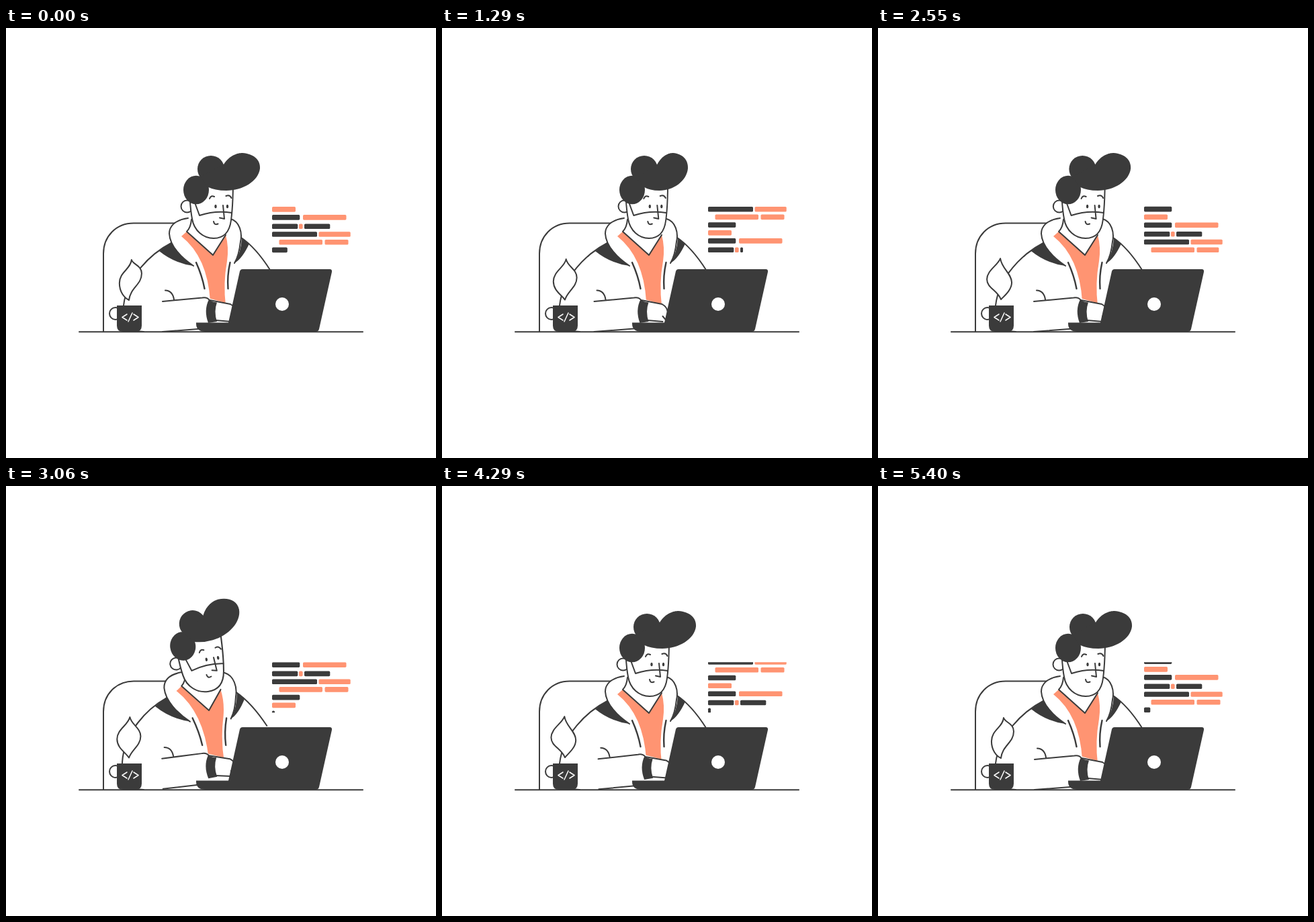
An HTML page that plays this animation: 640 by 640 pixels, repeating every 5.43 s.

```html
<!DOCTYPE html>
<html lang="en">
<head>
<meta charset="utf-8">
<title>Developer at work</title>
<style>
  html, body { margin: 0; width: 100%; height: 100%; overflow: hidden; background: #fff; }
  svg { display: block; width: 100%; height: 100%; }
  .line { fill: none; stroke: #3b3b3b; stroke-width: 2; stroke-linecap: round; stroke-linejoin: round; }
  .bold { stroke-width: 2.4; }
  .dark { fill: #3b3b3b; }
  .coral { fill: #ff9472; }
  .white { fill: #fff; }
</style>
</head>
<body>
<svg viewBox="0 0 640 640">
  <clipPath id="window"><rect x="390" y="262.3" width="130" height="74.9"/></clipPath>

  <path class="line" d="M145 452V336C145 310 164 290.500 190 290.500H260"/>

  <g id="torso">
    <path class="white" d="M268 283C250 288 243 296 243 306Q243 315 246 320C215 336 180 370 175 413C173 440 185 452 205 452H350L393 360Q372 325 349 311C352 300 346 288 336 284Z"/>
    <path class="line" d="M246 320C215 336 180 370 175 413C173 440 185 452 205 452M350 312Q372 327 393 360"/>
    <path class="coral" d="M261 310L269 303L308 338L327 308Q332 326 329 347Q323 380 327 413L304 407Q300 341 261 310Z"/>
    <path class="line" d="M276 285Q275 297 269 303L308 338L327 308"/>
    <path class="line" d="M271 283C250 286 243 296 243 306C244 325 262 343 279 354M334 284C348 288 352 305 349 318Q347 338 340 350"/>
    <path class="dark" d="M228 332L246 319Q258 340 279 354Q250 350 228 332ZM351 312L362 321Q352 343 340 350Q350 334 351 312Z"/>
    <path class="line bold" d="M283 349Q292 369 295.500 388M333.500 349Q329 369 330.500 388"/>
  </g>

  <g id="arm">
    <path class="white" d="M233 408L298 401L340 413V438L290 448L233 451Z"/>
    <path class="line" d="M233 407L292 401.500Q299 400 303 405L334 411Q341 415 342 421M233 452L292 447.500M237 390.500Q248 391 250 404M312 435L335 437M335 429L340 435"/>
    <path class="dark" d="M302 404Q307 408 314 408.500Q309 422 314 437L301 439Q294 420 302 404Z"/>
  </g>

  <g id="head">
    <g id="ear"><circle class="line" cx="269.500" cy="265.500" r="9" style="fill:#fff"/></g>
    <g id="face">
      <path class="line" style="fill:#fff" d="M273 240Q274 268 277 284C280 302 294 313 309 313C325 313 333 302 335 286Q338 264 338 226Z"/>
    </g>
    <g id="features">
      <path class="line" d="M281 260L288 279Q312 271 336 275"/>
      <path class="line" d="M323 264L325 284L318 282.500M309 288Q310 294 315.500 291.500M303 254Q305 248.500 310 251M327.500 250Q333 247.500 335.500 253"/>
      <ellipse class="dark" cx="312" cy="265.500" rx="1.700" ry="2.800"/>
      <ellipse class="dark" cx="329.500" cy="265.500" rx="1.700" ry="2.800"/>
    </g>
    <ellipse class="dark" cx="283" cy="241" rx="19" ry="21.300"/>
    <circle class="dark" id="curl" cx="305" cy="210" r="20"/>
    <path class="dark" id="quiff" d="M290 221L324 203C333 189 345 186 352 186C368 187 379 196 378 209C376 228 352 242 328 242Q311 242 299 236Z"/>
  </g>

  <path class="line" id="steam" style="fill:#fff"/>
  <circle class="line" cx="163" cy="425" r="9"/>
  <path class="dark" d="M165 413H202V443Q202 452 193 452H174Q165 452 165 443Z"/>
  <path class="line" style="stroke:#fff;stroke-width:1.500" d="M180 426L173 430.500L180 435M188 424L182 437M190 426L197 430.500L190 435"/>

  <path class="dark" d="M283 438.500H331L348 362Q349 359 352 359H482Q485.500 359 485 363L466 448Q465 452 461 452H297Q283 452 283 440Z"/>
  <circle class="white" cx="411" cy="411" r="10"/>
  <path class="line" d="M109 452.300H531"/>

  <g id="code" clip-path="url(#window)"></g>
</svg>
<script>
const $ = id => document.getElementById(id);
const LOOP = 5430, TICK = 30, HALF = LOOP / 2 / TICK;
const DARK = 'dark', CORAL = 'coral';

// start is in ticks; gap is the distance to the row above; bars are [x, width, colour]
const rows = [
  { start: -3.8, gap: 11.7, bars: [[396, 41.3, DARK]] },
  { start: 3.6, gap: 11.8, bars: [[396, 35, CORAL]] },
  { start: 10.3, gap: 12, bars: [[396, 41.3, DARK], [442, 64.5, CORAL]] },
  { start: 29.2, gap: 13.3, bars: [[396, 38.3, DARK], [436, 5.6, CORAL], [444, 38.3, DARK]] },
  { start: 50, gap: 11.8, bars: [[396, 67, DARK], [465.5, 47.2, CORAL]] },
  { start: 67.7, gap: 11.7, bars: [[406.5, 64.5, CORAL], [474.5, 35, CORAL]] }
];

const clamp = x => Math.min(1, Math.max(0, x));
const smooth = x => x * x * (3 - 2 * x);
const cubic = x => x < .5 ? 4 * x ** 3 : 1 - 4 * (1 - x) ** 3;
// rises over a..b, holds, falls over c..d
const pulse = (t, a, b, c, d) => smooth(clamp((t - a) / (b - a))) - smooth(clamp((t - c) / (d - c)));
const move = (id, value) => $(id).setAttribute('transform', value);

function drawRow(row, y, time) {
  const total = row.bars.reduce((sum, bar) => sum + bar[1], 0);
  let done = 0, out = '';
  for (const [x, width, colour] of row.bars) {
    const part = clamp((time * total - done) / width);
    done += width;
    if (part > 0) {
      const w = Math.min(width, Math.max(4, width * cubic(part)));
      out += `<rect class="${colour}" x="${x}" y="${y - 3.8}" width="${w}" height="7.6" rx="1.6"/>`;
    }
  }
  return out;
}

function drawCode(t) {
  let tick = t / TICK % HALF;
  if (tick >= HALF + rows[0].start) tick -= HALF;
  let i = rows.length - 1;
  while (rows[i].start > tick) i--;
  const row = rows[i];
  const next = i < 5 ? rows[i + 1].start : rows[0].start + HALF;
  const age = tick - row.start;
  let y = 330.2 + row.gap * (1 - clamp(age / 3.9));
  let out = drawRow(row, y, age / (next - row.start));
  for (let k = 0; k < 6; k++) {
    y -= rows[i].gap;
    i = (i + 5) % 6;
    out += drawRow(rows[i], y, 1);
  }
  $('code').innerHTML = out;
}

const steamA = [187, 345, 186, 359, 169, 363, 169, 380, 169, 393, 176, 402, 183, 405, 185, 386, 202, 382, 202, 365, 202, 353, 189, 352];
const steamB = [182, 343, 178, 353, 162, 361, 162, 374, 162, 387, 178, 390, 183, 404, 188, 399, 199, 390, 199, 379, 199, 366, 184, 358];

function drawSteam(t) {
  const mix = (1 - Math.cos((t + 3 * TICK) / LOOP * 6 * Math.PI)) / 2;
  const p = steamA.map((a, i) => (a + (steamB[i] - a) * mix).toFixed(2));
  $('steam').setAttribute('d', `M${p.slice(0, 2)}C${p.slice(2)} ${p.slice(0, 2)}Z`);
}

function draw(t) {
  const turn = pulse(t, 570, 1170, 2100, 2700);
  const tilt = pulse(t, 2850, 3040, 3240, 3450);
  const lift = pulse(t, 2800, 3000, 4100, 4500);
  const lean = .052 * tilt, grow = 1 + .035 * tilt;

  move('torso', `matrix(1 0 ${lean} ${grow} ${-452 * lean} ${452 * (1 - grow)})`);
  move('arm', `translate(${-6.5 * turn} ${-1.3 * lift}) rotate(${-2 * lift} 232 430)`);
  move('head', `translate(${-10 * tilt} ${-7 * tilt}) rotate(${-8 * tilt} 310 313)`);
  move('ear', `translate(${2 * turn} 0)`);
  move('face', `translate(275 0) scale(${1 - .03 * turn + .05 * tilt} 1) translate(-275 0)`);
  move('features', `translate(${3 * tilt - 2.7 * turn} 0)`);
  move('curl', `translate(${-4 * turn - 3 * tilt} 0)`);
  move('quiff', `translate(300 236) rotate(${-8 * tilt}) scale(${1 - .154 * turn} 1) translate(-300 -236)`);
  drawSteam(t);
  drawCode(t);
}

const begin = performance.now();
function frame() {
  draw((performance.now() - begin) % LOOP);
  requestAnimationFrame(frame);
}
frame();
</script>
</body>
</html>
```
